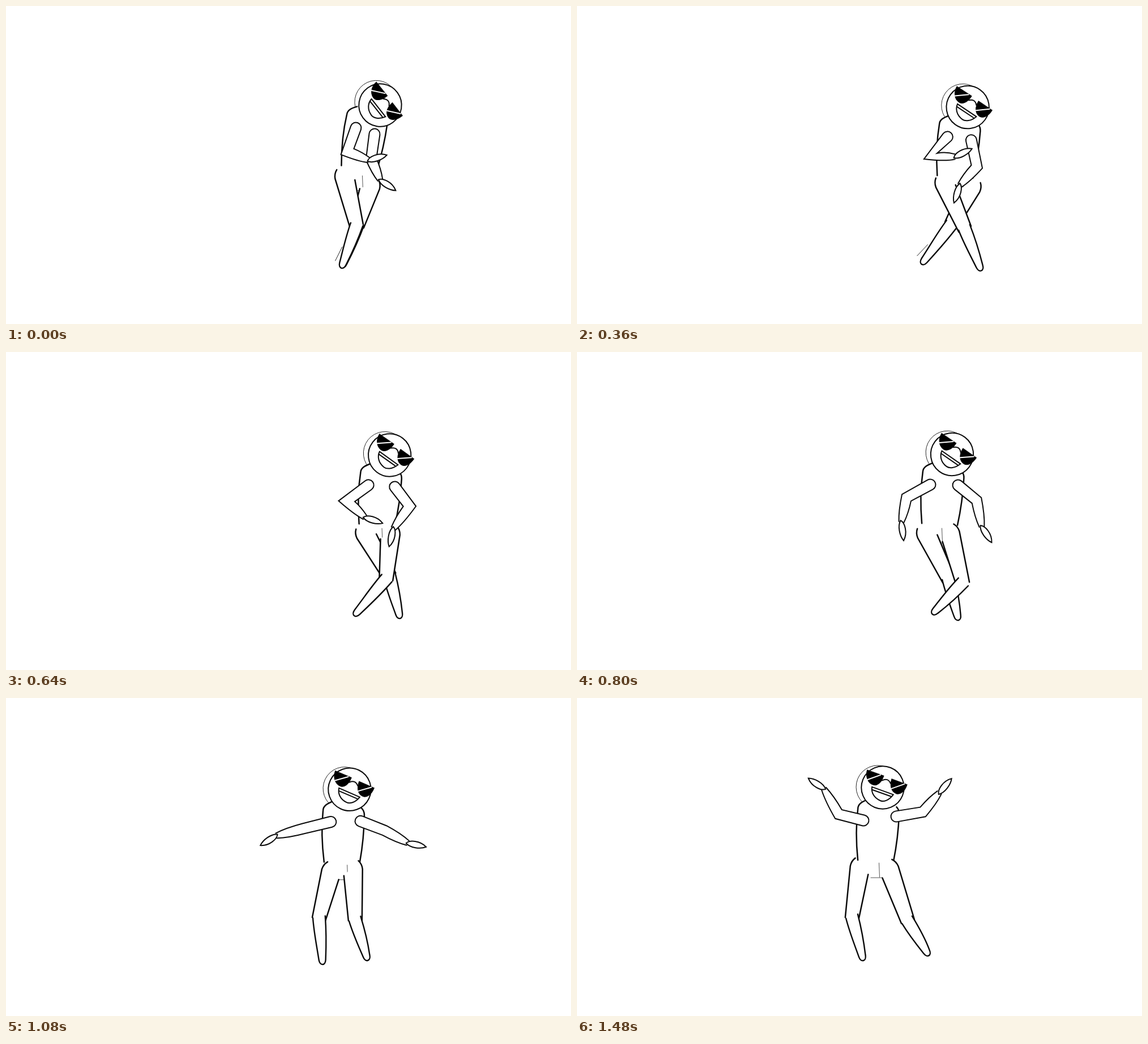
Recreate the animation shown at these times as an HTML page with a canvas. Size 998x561 px, loop 1.52 s.

```html
<!DOCTYPE html>
<html lang="en">
<head>
<meta charset="utf-8">
<title>Dancer</title>
<style>
html, body { margin: 0; width: 100%; height: 100%; overflow: hidden; background: #fff; }
canvas { display: block; width: 998px; height: 561px; }
</style>
</head>
<body>
<canvas id="stage" width="998" height="561"></canvas>
<script>
const ctx = document.getElementById('stage').getContext('2d');
const LOOP = 1520, STEP = 40, RAD = Math.PI / 180;
const times = [0, 200, 480, 800, 960, 1240, 1480];

// head x, y, tilt; waist x, y, tilt
const body = [
  [661, 175, 54, 624, 287, 8],
  [687, 178.5, 37, 663, 300, 5],
  [687, 178.5, 37, 665, 303, 4],
  [662.5, 180.5, 37, 641, 305, 3],
  [632, 151, 28, 617, 280, 1],
  [575, 178.5, 24, 563, 308, 1],
  [540, 158, 22, 528, 288, 2]
];

// Limbs: root, middle joint, end, then the angle of the hand
const armL = polar([
  [618, 215, 603, 257, 641, 272, -16],
  [650, 229, 626, 264, 667, 279, -8],
  [651, 231, 617, 264, 660, 264, -26],
  [624, 234, 582, 257, 573, 300, 83],
  [598, 207, 552, 226, 503, 226, 167],
  [542, 237, 494, 238, 454, 269, 119],
  [506, 216, 462, 205, 436, 160, 214]
]);
const armR = polar([
  [651, 226, 645, 270, 661, 307, 34],
  [689, 236, 687, 287, 687, 325, 65],
  [695, 236, 713, 277, 671, 301, 127],
  [673, 235, 706, 262, 715, 308, 58],
  [649, 206, 690, 226, 736, 229, -11],
  [596, 235, 640, 246, 662, 288, 45],
  [564, 209, 611, 201, 640, 167, -49]
]);
const legL = polar([
  [597, 295, 619, 387, 592, 463],
  [640, 303, 669, 396, 706, 467],
  [645, 310, 686, 390, 704, 469],
  [615, 315, 656, 400, 674, 474],
  [598, 290, 595, 381, 582, 463],
  [545, 317, 507, 400, 542, 473],
  [501, 293, 486, 387, 506, 464]
]);
const legR = polar([
  [645, 312, 621, 386, 593, 462],
  [691, 318, 652, 395, 599, 454],
  [695, 312, 664, 383, 614, 461],
  [657, 315, 681, 407, 627, 463],
  [633, 288, 659, 379, 659, 453],
  [584, 312, 566, 406, 607, 473],
  [549, 297, 584, 393, 622, 455]
]);

const P = d => new Path2D(d);
const shapes = {
  torso: P('M-19-108C-28-104-35-100-35-92C-38-60-36-30-32-1M33-97Q38-92 38-85C38-55 35-25 31-1'),
  torsoFill: P('M-19-108C-28-104-35-100-35-92C-38-60-36-30-32-1L31-1C35-25 38-55 38-85Q38-92 33-97Z'),
  hand: P('M-3 1C2-6 20-9 33 0C24 6 6 8-3 1Z'),
  lensL: P('M-37-18.5L-6-20C-5-6-11 2-18 2C-28 2-36-7-37-18.5Z'),
  lensR: P('M9-20L38-21C39-8 33 1 26 1C16 1 10-8 9-20Z'),
  glare: P('M-30-3L-12-19M15-4L33-20'),
  bridge: P('M-6-11Q2-20 10-12'),
  mouth: P('M-18 6L22 4.5C19 17 11 23 5 23C-8 23-16 15-18 6Z'),
  teeth: P('M-16 10.5L19 9')
};

// Points to lengths and unwrapped angles
function polar(rows) {
  let prev;
  return rows.map(([x, y, mx, my, ex, ey, hand = 0]) => {
    const turn = (a, i) => prev ? a - 2 * Math.PI * Math.round((a - prev[i]) / (2 * Math.PI)) : a;
    prev = [x, y,
      Math.hypot(mx - x, my - y), turn(Math.atan2(my - y, mx - x), 3),
      Math.hypot(ex - mx, ey - my), turn(Math.atan2(ey - my, ex - mx), 5),
      hand * RAD];
    return prev;
  });
}

// Cubic Hermite through the key poses
function sample(rows, t) {
  const last = times.length - 1;
  let i = 0;
  while (i < last - 1 && t >= times[i + 1]) i++;
  const h = times[i + 1] - times[i], u = Math.min(1, (t - times[i]) / h);
  const slope = (k, c) => {
    const a = Math.max(0, k - 1), b = Math.min(last, k + 1);
    return (rows[b][c] - rows[a][c]) / (times[b] - times[a]);
  };
  return rows[i].map((p, c) => {
    const q = rows[i + 1][c], m = slope(i, c) * h, n = slope(i + 1, c) * h;
    return p + u * (m + u * (3 * (q - p) - 2 * m - n + u * (2 * (p - q) + m + n)));
  });
}

function ink(path, width, fill) {
  if (fill) { ctx.fillStyle = fill; ctx.fill(path); }
  ctx.lineWidth = width;
  ctx.stroke(path);
}

function at(x, y, angle, draw) {
  ctx.save();
  ctx.translate(x, y);
  ctx.rotate(angle);
  draw();
  ctx.restore();
}

const along = (x, y, len, a) => [x + len * Math.cos(a), y + len * Math.sin(a)];

function drawArm([x, y, l1, a1, l2, a2, hand]) {
  const [ex, ey] = along(x, y, l1, a1), [wx, wy] = along(ex, ey, l2, a2);
  const n1 = [-Math.sin(a1), Math.cos(a1)], n2 = [-Math.sin(a2), Math.cos(a2)];
  const miter = 9 / Math.max(0.6, 1 + Math.cos(a2 - a1));
  const corner = s => [ex + s * miter * (n1[0] + n2[0]), ey + s * miter * (n1[1] + n2[1])];
  const wrist = s => [wx + s * 4.5 * n2[0], wy + s * 4.5 * n2[1]];
  const belly = s => along(ex + s * 9 * n2[0], ey + s * 9 * n2[1], l2 * 0.6, a2);
  const path = new Path2D();
  path.moveTo(...wrist(1));
  path.quadraticCurveTo(...belly(1), ...corner(1));
  path.arc(x, y, 9.5, a1 + Math.PI / 2, a1 + Math.PI * 1.5);
  path.lineTo(...corner(-1));
  path.quadraticCurveTo(...belly(-1), ...wrist(-1));
  ink(path, 2, '#fff');
  at(wx, wy, hand, () => ink(shapes.hand, 2, '#fff'));
}

function drawLeg([x, y, l1, a1, l2, a2], side, whisker) {
  const [kx, ky] = along(x, y, l1, a1);
  at(x, y, a1, () => {
    ctx.scale(1, side);
    const outer = `M-9 11Q-3 17 6 17.5L${l1 + 2} 12`;
    ctx.fillStyle = '#fff';
    ctx.fill(P(`${outer}L${l1} -12L16-16Z`));
    ink(P(`${outer}M16-16L${l1 + 1} -12`), 2.5);
  });
  at(kx, ky, a2, () => {
    if (whisker) ink(P(`M${l2 - 8} 15L${l2 - 35} 12`), 0.8);
    ink(P(`M-1 11C25 11 48 8 ${l2 - 9} 6C${l2 + 2} 5 ${l2 + 2} -5 ${l2 - 9} -6C48-9 25-11-3-11`), 2.4, '#fff');
  });
}

function drawHead(x, y, tilt) {
  at(x, y, tilt * RAD, () => {
    const disc = (cx, cy) => {
      const p = new Path2D();
      p.arc(cx, cy, 37.7, 0, 2 * Math.PI);
      return p;
    };
    ink(disc(0, 0), 2, '#fff');
    ink(shapes.mouth, 2);
    ink(shapes.teeth, 2);
    ink(shapes.bridge, 2);
    ink(shapes.lensL, 1, '#000');
    ink(shapes.lensR, 1, '#000');
    ctx.strokeStyle = '#fff';
    ink(shapes.glare, 2);
  });
}

function drawHalo(x, y, tilt) {
  at(x, y, tilt * RAD, () => {
    const p = new Path2D();
    p.arc(-8.7, 2.4, 38, 0, 2 * Math.PI);
    ink(p, 0.8);
  });
}

function render(t) {
  const [hx, hy, tilt, wx, wy, lean] = sample(body, t);
  const left = sample(legL, t), right = sample(legR, t);
  ctx.fillStyle = '#fff';
  ctx.fillRect(0, 0, 998, 561);
  ctx.strokeStyle = '#0a0a0a';
  ctx.lineCap = 'round';

  drawHalo(hx, hy, tilt);
  at(wx, wy, lean * RAD, () => {
    ctx.fillStyle = '#fff';
    ctx.fill(shapes.torsoFill);
    ink(shapes.torso, 2.5);
  });
  at((left[0] + right[0]) / 2, (left[1] + right[1]) / 2, 0, () => {
    ink(P('M8.5-4L9.5 21M-6 22H19'), 0.7);
  });

  // The right leg passes in front halfway through
  const legs = [() => drawLeg(right, -1, t < 640), () => drawLeg(left, 1, false)];
  if (t >= 640) legs.reverse();
  legs.forEach(draw => draw());

  drawArm(sample(armR, t));
  drawArm(sample(armL, t));
  drawHead(hx, hy, tilt);
}

const start = performance.now();
function tick() {
  const t = (performance.now() - start) % LOOP;
  render(Math.floor(t / STEP) * STEP);
  requestAnimationFrame(tick);
}
tick();
</script>
</body>
</html>
```
